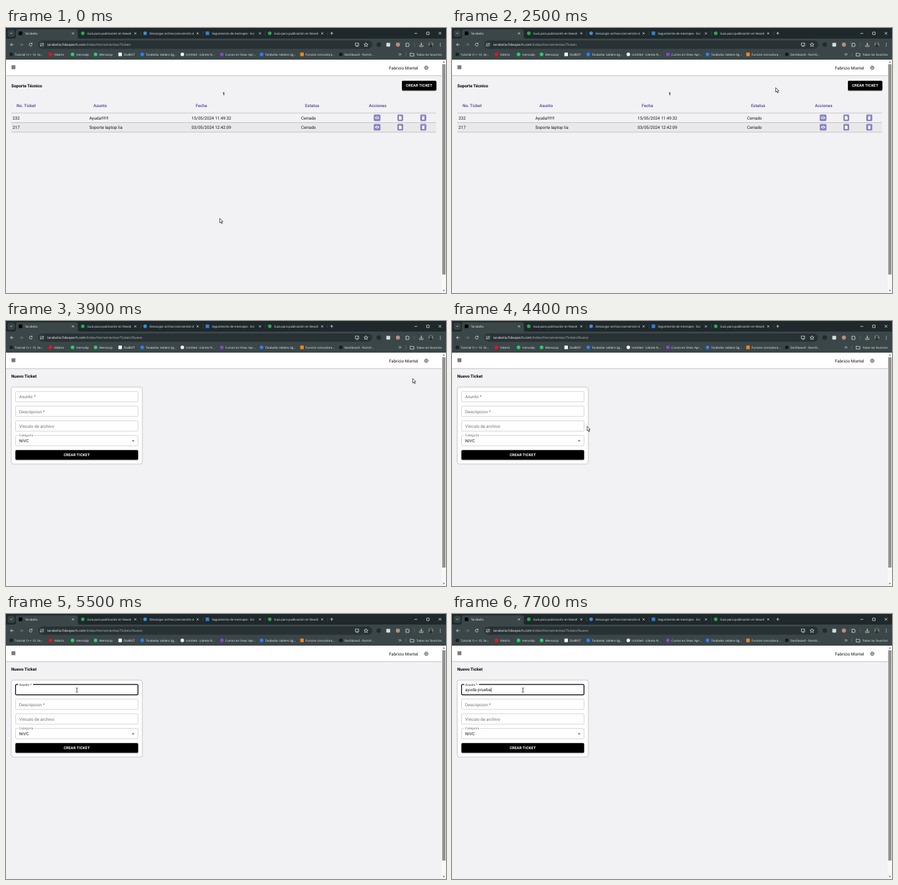
These frames come from a looping animation (668x402 px, 8 s). An HTML page:

```html
<!DOCTYPE html>
<html lang="es">
<head>
<meta charset="utf-8">
<title>Soporte</title>
<style>
  html, body { margin: 0; width: 100%; height: 100%; overflow: hidden; background: #f2f2f5; }
  svg { display: block; width: 668px; height: 402px; }
  text { white-space: pre; text-rendering: geometricPrecision; font: 6.4px Roboto, sans-serif; fill: #161616; }
  .ui text { font: 4.55px "Open Sans", sans-serif; fill: #eef1f1; }
  .ui text.url { font-size: 5.2px; fill: #f3f5f5; }
  .url .path { fill: #b3bcbe; }
  .ui .line { fill: none; stroke: #e3e8e8; stroke-width: .75; }
  .bold { font-weight: 700; fill: #000; }
  .head { font-weight: 500; fill: #47448f; }
  text.btn { font-size: 5.6px; font-weight: 700; letter-spacing: .16px; fill: #fff; text-anchor: middle; }
  .form text:not(.btn) { letter-spacing: .06px; }
  .form .hint { fill: #6c6c6c; }
  .form .small { font-size: 4.8px; }
  .field { fill: #fff; stroke: #b9b9b9; stroke-width: .6; }
  .field.hover { stroke: #262626; stroke-width: .8; }
  .field.focus { stroke: #000; stroke-width: 1.2; }
  .cursor { fill: #fff; stroke: #000; stroke-width: .65; stroke-linejoin: round; }
</style>
</head>
<body>
<svg viewBox="0 0 668 402">
  <rect width="668" height="402" fill="#f2f2f5"/>

  <g class="ui">
    <rect width="668" height="18" fill="#1f282b"/>
    <rect y="16" width="668" height="32" fill="#3b4649"/>
    <path d="M12 16q3 0 3-3V5q0-3 3-3h88q3 0 3 3v8q0 3 3 3z" fill="#3b4649"/>
    <rect x="2.5" y="2.5" width="11" height="11" rx="3.5" fill="#364144"/>
    <path class="line" d="M6.4 7.2 8 8.8 9.6 7.2"/>
    <g id="tabs"></g>
    <path class="line" d="M492.3 8h4.4M494.5 5.8v4.4M620 8.2h4.4M638.6 6.2h3.8v3.8h-3.8zM656.8 6l4 4m0-4-4 4"/>

    <rect x="49" y="19" width="507" height="12.4" rx="6.2" fill="#283134"/>
    <path class="line" d="M11.6 25.2H6.8m2.2-2.3-2.3 2.3 2.3 2.3"/>
    <path class="line" opacity=".4" d="M20.8 25.2h4.8m-2.2-2.3 2.3 2.3-2.3 2.3"/>
    <path class="line" d="M39.4 23.9a2.2 2.2 0 1 0 .3 1.9M39.7 22.6v1.6h-1.6"/>
    <circle cx="54.5" cy="25.2" r="4.3" fill="#3b4649"/>
    <path class="line" d="M52.2 24h2m1.3 0a.7.7 0 1 0 1.4 0 .7.7 0 1 0-1.4 0M56.8 26.6h-2m-2.6 0a.7.7 0 1 0 1.4 0 .7.7 0 1 0-1.4 0"/>
    <text class="url" x="62.5" y="27.1">tarabelia.fideapech.com<tspan class="path" id="path"></tspan></text>
    <path class="line" d="M533.6 22.8h-3.2v4h5.4v-1.3M531.6 28h3M534.9 22v2.7m-1.2-1.2 1.2 1.2 1.2-1.2"/>
    <path class="line" d="m546.5 22.3.9 2 2.1.2-1.6 1.5.5 2.1-1.9-1.1-1.9 1.1.5-2.1-1.6-1.5 2.1-.2z"/>
    <circle cx="566" cy="25.2" r="3.4" fill="#222b2e"/>
    <rect x="577.4" y="22.4" width="5.8" height="5.8" rx="1" fill="#d4dfd6"/>
    <circle cx="595" cy="25.2" r="3.1" fill="#b98c7c"/>
    <path class="line" d="M606.9 23.4h1.6a.8.8 0 1 1 1.6 0h1.5v1.5a.8.8 0 1 1 0 1.6v1.5h-4.7v-1.4a.9.9 0 1 0 0-1.8z"/>
    <path d="M620 22v6.6" stroke="#667275" stroke-width=".6"/>
    <path class="line" d="M630.5 22v4.2m-1.8-1.7 1.8 1.8 1.8-1.8M627.9 26.2v1.8h5.2v-1.8"/>
    <circle cx="645" cy="25.2" r="3.8" fill="#77756c"/>
    <path d="M642.2 27.7q.5-2.1 2.8-2.2 2.3.1 2.8 2.2a3.8 3.8 0 0 1-5.6 0z" fill="#25292a"/>
    <circle cx="645" cy="24" r="1.4" fill="#25292a"/>
    <g fill="#e3e8e8"><circle cx="659.3" cy="23" r=".6"/><circle cx="659.3" cy="25.2" r=".6"/><circle cx="659.3" cy="27.4" r=".6"/></g>

    <g id="marks"></g>
    <path class="line" d="m596.2 38.4 1.6 1.6-1.6 1.6m2.2-3.2 1.6 1.6-1.6 1.6M613.6 38h2l.7.8h3v3.8h-5.7z"/>
    <path d="M607 36.8v6.4" stroke="#667275" stroke-width=".6"/>
    <text x="623" y="41.7" style="font-size:4.45px">Todos los favoritos</text>
  </g>

  <rect y="48" width="661.5" height="24" fill="#fff"/>
  <path d="M0 72.2h661.5" stroke="#a9a9a9" stroke-width=".7"/>
  <rect x="8.4" y="56.6" width="5.8" height="5.8" fill="#6f6f6f"/>
  <path d="M8.4 58.5h5.8m-5.8 2h5.8" stroke="#aaa" stroke-width=".4"/>
  <text x="581.5" y="62.6">Fabricio Montel</text>
  <g fill="none" stroke="#333">
    <circle cx="638" cy="60.3" r="2.3" stroke-width=".7"/>
    <circle cx="638" cy="60.3" r="2.9" stroke-width=".8" stroke-dasharray="1.1 1.18"/>
    <circle cx="638" cy="60.3" r=".9" stroke-width=".6"/>
  </g>
  <rect x="661.5" y="48" width="6.5" height="354" fill="#f8f8f8"/>
  <rect x="662.3" y="55" width="4.9" height="319" fill="#919191"/>
  <path d="m663.1 52.4 1.6-2 1.6 2zM663.1 397.4l1.6 2 1.6-2z" fill="#606060"/>

  <g id="list">
    <text class="bold" x="8" y="89.5">Soporte Técnico</text>
    <rect x="601" y="81" width="52.6" height="15" rx="1.8" fill="#000" opacity=".25"/>
    <rect x="601" y="80" width="52.4" height="14.8" rx="1.7"/>
    <text class="btn" x="627.2" y="89.2">CREAR TICKET</text>
    <text class="bold" x="328.8" y="102.4">1</text>
    <g id="table"></g>
  </g>

  <g id="form" class="form">
    <text class="bold" x="8" y="86.2">Nuevo Ticket</text>
    <rect x="8" y="100.2" width="199" height="116.8" rx="3" fill="#fff" stroke="#b4b4b4" stroke-width=".7"/>
    <g id="fields"></g>
    <text class="hint" x="20" y="139.5">Descripcion *</text>
    <text class="hint" x="20" y="161.7">Vínculo de archivo</text>
    <path d="M18.5 173.6h24" stroke="#fff" stroke-width="1.6"/>
    <text class="hint small" x="20" y="175.3">Categoría</text>
    <text x="20" y="184">NIVC</text>
    <path d="M191 181.1h4l-2 2z" fill="#555"/>
    <rect x="14.3" y="196.8" width="186.3" height="14.8" rx="1.7" opacity=".25"/>
    <rect x="14.3" y="195.8" width="186.3" height="14.8" rx="1.7"/>
    <text class="btn" x="107.4" y="205">CREAR TICKET</text>
    <path id="notch" d="M18.5 107h22.5" stroke="#fff" stroke-width="2"/>
    <text id="label" class="hint">Asunto *</text>
    <text id="typed" x="20" y="117.2"></text>
    <rect id="caret" y="111.6" width=".5" height="7"/>
  </g>

  <g id="cursor" class="cursor">
    <path data-kind="arrow" d="M0 0v6.7l1.5-1.4 1.2 2.7 1.2-.5-1.2-2.6h2.1z"/>
    <path data-kind="hand" d="M-.9.7q0-.9.8-.9t.8.9v2.6q.8-.7 1.4.1.8-.6 1.3.2.9-.4 1.1.6v2q0 2.2-1.6 2.6H.2Q-.9 7.900-2.600 5.300q-.5-1 .3-1.200l1.400 1z"/>
    <path data-kind="text" fill="none" d="M-1.500-3.200q1.500 0 1.500.7v5q0 .7-1.500.7m3-6.400q-1.500 0-1.500.7m0 5q0 .7 1.500.7"/>
  </g>
</svg>
<script>
const LOOP = 8000, STEP = 100;
const $ = id => document.getElementById(id);
const put = (id, html) => { $(id).innerHTML = html; };
const text = (x, y, s, cls = '') => `<text x="${x}" y="${y}" class="${cls}">${s}</text>`;
const dot = (x, y, color, square) =>
  `<rect x="${x - 2.7}" y="${y - 2.7}" width="5.4" height="5.4" rx="${square ? .8 : 2.7}" fill="${color}"/>`;

const guide = 'Guía para publicación en Nexoli';
put('tabs', [
  ['Tarabelia', '#000', 1],
  [guide, '#2da657'],
  ['Descargar archivo (conversión d', '#3b8ede'],
  ['Seguimiento de mensajes - Exi', '#2f7fd6', 1],
  [guide, '#2da657'],
].map(([title, color, square], i) => {
  const x = 22 + i * 94.6, w = title.length > 10 ? 68 : 60;
  return dot(x, 8, color, square)
    + `<clipPath id="c${i}"><path d="M${x + 6} 2h${w}v12h-${w}z"/></clipPath>`
    + `<g clip-path="url(#c${i})">${text(x + 6.7, 9.7, title)}</g>`
    + `<path class="line" d="m${x + 78.2} 6.700 3 3m0-3-3 3"/>`
    + (i ? `<path d="M${x + 88} 5v6.500" stroke="#515c5f" stroke-width=".5"/>` : '');
}).join(''));

put('marks', [
  [8, 'Tutorial C++ 10. Se...', '#1b2022'],
  [67.5, 'Vidorla', '#f01414'],
  [101, 'mensalip', '#25d366'],
  [136, 'MensaLip', '#25d366'],
  [173.3, 'DialBOT', '#f4f4f4', 1],
  [206.8, 'Tarabelia: tablero ág...', '#2684ff'],
  [267.7, 'Untitled - Libreta N...', '#f4f4f4'],
  [327.7, 'Cursos en línea: Apr...', '#8f42d6'],
  [388, 'Tarabelia: tablero ág...', '#2684ff'],
  [449.4, 'Funcion consultora...', '#ee8522', 1],
  [508.3, 'Dashboard - RumiV...', '#15191b'],
].map(([x, s, color, square]) => dot(x, 40, color, square) + text(x + 5.4, 41.7, s)).join(''));

const icons = [
  [563.4, 5.1, '<path d="M-3.200 0Q0-4 3.200 0 0 4-3.200 0z"/><circle r="1.200" fill="#8784bf"/>'],
  [598.6, 4.4, '<path d="M-2-2.700h2.500L2-1.200v3.900h-4z"/>'],
  [633.5, 4.6, '<path d="M-1.700-1.500h3.400v4.200h-3.400zM-2.200-2.800h4.400v.8h-4.400z"/>'],
];
const row = (y, cells) => [10, 126.5, 281.7, 448].map((x, i) => text(x, y + 9.5, cells[i])).join('')
  + icons.map(([x, r, shape]) => `<g transform="translate(${x} ${y + 7.2})" fill="#fff">
      <rect x="${-r}" y="-5" width="${2 * r}" height="10" rx="1.600" fill="#8784bf"/>${shape}</g>`).join('');
put('table',
  [[16, 'No. Ticket'], [132.7, 'Asunto'], [288, 'Fecha'], [454, 'Estatus'], [551, 'Acciones']]
    .map(([x, s]) => text(x, 119.5, s, 'head')).join('')
  + '<rect x="8" y="143.500" width="645" height="14.500" fill="#e9e9ea"/>'
  + '<path d="M8 129h645M8 143.500h645M8 158h645" stroke="#b2b2b2" stroke-width=".7"/>'
  + row(129, ['232', 'Ayuda!!!!!!!', '15/05/2024 11:49:32', 'Cerrado'])
  + row(143.4, ['217', 'Soporte laptop lia', '03/05/2024 12:42:09', 'Cerrado']));

const fieldY = [106.9, 129.1, 151.4, 173.6];
put('fields', fieldY.map(y =>
  `<rect class="field" x="14.500" y="${y}" width="185.900" height="15.700" rx="1.600"/>`).join(''));
const fields = [...$('fields').children];
const pointers = [...$('cursor').children];

// Pointer stops: time, x, y
const stops = [
  [0, 324.6, 288.8], [1600, 324.6, 288.8], [1700, 371.3, 277.3], [2500, 491.5, 90.5],
  [3200, 620.2, 87.3], [3800, 620.2, 87.3], [3900, 617.4, 87.2], [4000, 617.4, 87.2],
  [4500, 102, 178], [4600, 102, 178], [4700, 106, 117.8], [5100, 107.2, 115.4],
  [5300, 107.2, 115.4], [5400, 107.7, 115.4], [LOOP, 107.7, 115.4],
];
const keys = [6000, 6100, 6300, 6400, 6600, 6900, 7100, 7300, 7400, 7500, 7600, 7700];
const phrase = 'ayuda prueba';
const OPEN = 3900, CLICK = 4800, FLOAT = 200;

function pointerAt(t) {
  const i = stops.findIndex(s => s[0] > t);
  const [t0, x0, y0] = stops[i - 1], [t1, x1, y1] = stops[i];
  const k = (t - t0) / (t1 - t0);
  return [x0 + (x1 - x0) * k, y0 + (y1 - y0) * k];
}

const show = (el, on) => { el.style.display = on ? '' : 'none'; };

function draw(t) {
  const onForm = t >= OPEN, focused = t >= CLICK;
  show($('list'), !onForm);
  show($('form'), onForm);
  $('path').textContent = '/Index/Herramientas/Tickets' + (onForm ? '/Nuevo' : '');

  const [x, y] = pointerAt(t);
  const over = onForm && x > 14 && x < 201 ? fieldY.findIndex(f => y >= f && y <= f + 15.7) : -1;
  const onButton = !onForm && x > 601 && x < 653 && y > 80 && y < 95;
  const kind = onButton || over === 3 ? 'hand' : over >= 0 ? 'text' : 'arrow';
  $('cursor').setAttribute('transform', `translate(${x} ${y})`);
  pointers.forEach(p => show(p, p.dataset.kind === kind));
  fields.forEach((f, i) => {
    f.classList.toggle('hover', i === over);
    f.classList.toggle('focus', i === 0 && focused);
  });

  const k = Math.min(1, Math.max(0, (t - CLICK) / FLOAT));
  const e = 1 - (1 - k) ** 3;
  $('label').setAttribute('transform', `translate(20 ${117.2 - 8.7 * e}) scale(${1 - .25 * e})`);
  $('label').style.fill = focused ? '#222' : '';
  show($('notch'), focused);

  const count = keys.filter(key => key <= t).length;
  $('typed').textContent = phrase.slice(0, count);
  show($('caret'), count || (focused && t < 5400));
  $('caret').setAttribute('x', 20 + (count ? $('typed').getComputedTextLength() : 0));
}

let start;
function tick(now) {
  start ??= now;
  const t = (now - start) % LOOP;
  draw(Math.floor(t / STEP) * STEP);
  requestAnimationFrame(tick);
}
draw(0);
requestAnimationFrame(tick);
</script>
</body>
</html>
```
